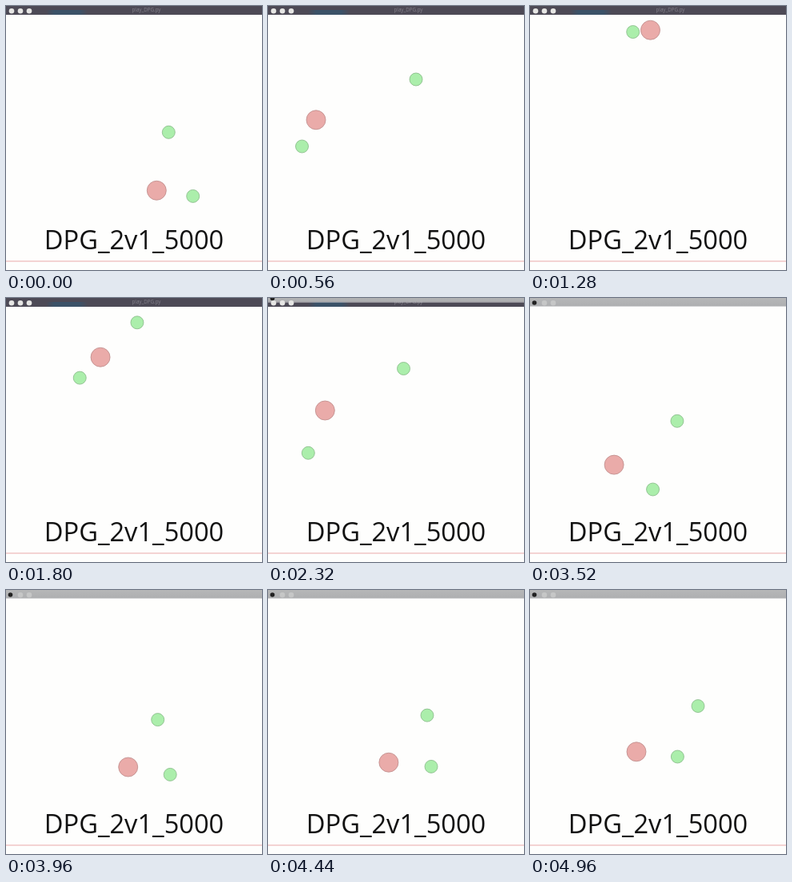
Recreate the animation shown at these times as an HTML page. Size 320 by 331 pixels, loop 5000 ms.

```html
<!DOCTYPE html>
<html lang="en">
<head>
<meta charset="utf-8">
<title>DPG_2v1_5000</title>
<style>
  html, body { margin: 0; width: 100%; height: 100%; overflow: hidden; background: #fefefd; }
  svg { display: block; width: 100%; height: 100%; }
  text { font-family: "Open Sans", "Noto Sans", sans-serif; }
</style>
</head>
<body>
<svg viewBox="0 0 320 331">
  <defs>
    <linearGradient id="tab">
      <stop offset="0" stop-color="#3b5268" stop-opacity="0"/>
      <stop offset=".2" stop-color="#3b5268"/>
      <stop offset=".8" stop-color="#3b5268"/>
      <stop offset="1" stop-color="#3b5268" stop-opacity="0"/>
    </linearGradient>
    <linearGradient id="menuFill" x2="0" y2="1">
      <stop offset="0" stop-color="#b6b7b8"/>
      <stop offset="1" stop-color="#aeafb1"/>
    </linearGradient>
  </defs>
  <rect width="320" height="331" fill="#fefefd"/>
  <rect y="319.5" width="320" height="1" fill="#eba9a9"/>
  <text x="47.8" y="305" font-size="32.6" fill="#111">DPG_2v1_5000</text>

  <g stroke-width=".8">
    <circle id="runnerA" r="8" fill="#abeeab" stroke="#86b886"/>
    <circle id="runnerB" r="8" fill="#abeeab" stroke="#86b886"/>
    <circle id="chaser" r="12" fill="#eaaba9" stroke="#bd8b89"/>
  </g>

  <g id="titleBar">
    <rect width="320" height="11" fill="#4d4a56"/>
    <rect x="50" y="5" width="52" height="6" fill="url(#tab)"/>
    <text x="175.5" y="7.3" font-size="6.2" text-anchor="middle" fill="#85828c">play_DPG.py</text>
  </g>
  <g id="menu">
    <rect width="320" height="10" fill="url(#menuFill)"/>
    <rect y="10" width="320" height="1" fill="#d3d4d5"/>
    <circle cx="5.5" cy="6" r="2.8" fill="#222"/>
  </g>
  <g id="lights" fill="#e6e6e4">
    <circle id="firstLight" cx="7" cy="6.3" r="3.3"/>
    <circle cx="18" cy="6.3" r="3.3"/>
    <circle cx="29" cy="6.3" r="3.3"/>
  </g>
</svg>
<script>
const LOOP = 5000, STEP = 40;
const times = [0, 560, 1280, 2320, 3120, 3960, 4960];
const paths = {
  runnerA: [[203.3, 158.3], [185, 92], [163, -6], [169.5, 88.5], [179.5, 138.5], [189.7, 162.6], [210, 145.5]],
  runnerB: [[233.7, 238.4], [42.5, 176], [128.7, 32.5], [50.3, 194.3], [98.2, 239.7], [205.2, 231.4], [184.4, 209]],
  chaser: [[188.3, 231.3], [60, 142.8], [150.5, 30.2], [71.3, 141], [61, 189.2], [152.7, 222], [133, 202.8]]
};
const el = id => document.getElementById(id);
const clamp = v => Math.max(0, Math.min(1, v));

// Velocity at a waypoint, from its two neighbours
function slope(points, i, axis) {
  const a = Math.max(0, i - 1), b = Math.min(points.length - 1, i + 1);
  return (points[b][axis] - points[a][axis]) / (times[b] - times[a]);
}

// Cubic Hermite curve through the waypoints
function along(points, t, axis) {
  let i = 0;
  while (i < times.length - 2 && t >= times[i + 1]) i++;
  const span = times[i + 1] - times[i];
  const u = clamp((t - times[i]) / span), v = 1 - u;
  return points[i][axis] * (1 + 2 * u) * v * v
    + points[i + 1][axis] * u * u * (3 - 2 * u)
    + span * u * v * (slope(points, i, axis) * v - slope(points, i + 1, axis) * u);
}

function draw(ms) {
  const t = Math.floor((ms % LOOP) / STEP) * STEP;
  for (const id in paths) {
    el(id).setAttribute("cx", along(paths[id], t, 0).toFixed(2));
    el(id).setAttribute("cy", along(paths[id], t, 1).toFixed(2));
  }
  const drop = clamp((t - 2260) / 120);
  el("menu").setAttribute("transform", `translate(0 ${-11 + 11 * drop})`);
  el("menu").style.display = drop ? "" : "none";
  el("lights").style.opacity = 1 - 0.6 * clamp((t - 2320) / 120);
  el("firstLight").style.display = drop === 1 ? "none" : "";
}

const start = performance.now();
function tick() {
  draw(performance.now() - start);
  requestAnimationFrame(tick);
}
draw(0);
requestAnimationFrame(tick);
</script>
</body>
</html>
```
